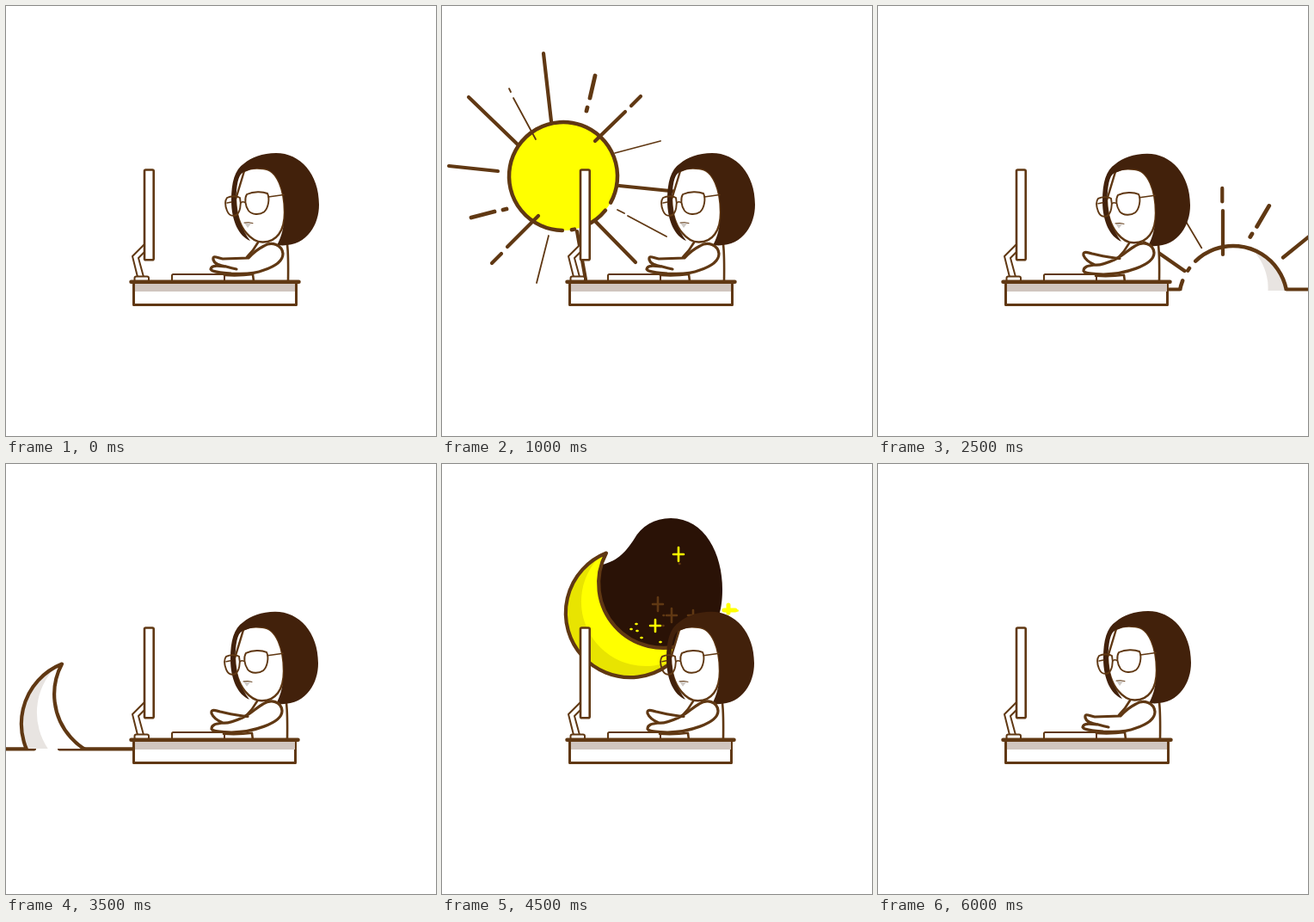
An HTML page that plays this animation: 500 px wide and 500 px high, repeating every 6500 ms.

```html
<!DOCTYPE html>
<html lang="en">
<head>
<meta charset="utf-8">
<title>Day and night at the desk</title>
<style>
  html, body { margin: 0; width: 100%; height: 100%; overflow: hidden; background: #fff; }
  svg { display: block; width: 500px; height: 500px; }
  .line { stroke: #603813; stroke-linecap: round; stroke-linejoin: round; }
  .shade { fill: #42210b; fill-opacity: .12; stroke: none; }
</style>
</head>
<body>
<svg viewBox="0 0 500 500" fill="none">
  <clipPath id="aboveGround"><path d="M0 0H500V331H0Z"/></clipPath>

  <path id="ground" class="line" stroke-width="4.2"/>

  <g clip-path="url(#aboveGround)">
    <g id="sun" class="line">
      <circle class="fill" r="63" stroke="none"/>
      <path id="sunShade" class="shade" d="M-57.1 26.4A63 63 0 1 1 62.9-1A63 63 0 0 0-57.1 26.4Z"/>
      <path id="sunRim" stroke-width="4.5"/>
      <g transform="translate(-141 -198)">
        <path stroke-width="4.2" d="M118 55L127 134M231 105L220 116M213 123L178 157M206 209L275 216M178 250L225 298M157 262L167 318M112 244L76 280M69 288L58 299M65 192L8 186M88 161L31 106"/>
        <path stroke-width="4.8" d="M178 81L172 107M169 118L168 122M75 236L71 237M61 239L34 246"/>
        <path stroke-width="1.8" d="M254 157L201 171M261 268L216 244M212 241L204 237M124 267L110 322M109 155L83 107M80 100L78 96"/>
      </g>
    </g>

    <g id="moon" class="line">
      <g id="night" stroke-width="2.6">
        <path fill="#2a1206" stroke="none" d="M186 117C205 113 215 100 223 88C232 72 247 63 266 63C306 63 326 105 326 146C326 180 315 214 262 215A75 75 0 0 1 186 117Z"/>
        <path d="M251 155v16M245 163h12M267 168v16M261 176h12M292 170v12M286 176h12M276 116h.5M257.500 176h.5M257 188h.5"/>
        <path stroke="#ff0" d="M275 97v16M269 105h12M248 181v14M242 188h12M225.500 186h1M219.500 192h1M226.500 194h1M231.500 202h1M253.500 207h1"/>
        <path stroke="#ff0" stroke-width="5" d="M333 164v9M328 170h10M341 170h-2"/>
        <path stroke="#ff0" d="M343.500 170.500h.2"/>
      </g>
      <path class="fill" stroke="none" d="M191 103.500A75 75 0 1 0 285 208.500A75 75 0 0 1 191 103.500Z"/>
      <path class="shade" d="M184.500 106.400A75 75 0 1 0 271.500 226.600A75 75 0 0 1 184.500 106.400Z"/>
      <path stroke-width="4.2" d="M191 103.500A75 75 0 1 0 285 208.500A75 75 0 0 1 191 103.500Z"/>
    </g>
  </g>

  <g class="line" fill="#fff">
    <path stroke-width="2" d="M161 277L147 291L153 315H160L154 293L161 286Z"/>
    <rect x="149.500" y="314.500" width="16.500" height="6" rx="2" stroke-width="2"/>
    <rect x="161" y="190.500" width="10.700" height="104.700" rx="1.500" stroke-width="2.600"/>
    <rect x="193" y="312" width="61" height="9" rx="1.500" stroke-width="2"/>
  </g>

  <g id="person" class="line">
    <path fill="#fff" stroke-width="2.600" d="M293 274L280 292L254 313L287 312.500L288 320H328V290L327 276Z" stroke="none"/>
    <path stroke-width="2.600" d="M327 277Q328.500 290 328 320M293 275Q288 284 280 292M254 313Q272 314 287 312L288 320"/>
    <path fill="#fff" stroke-width="2.400" d="M277 192C284 188 292 188 299 189C316 190 324 215 324 240C324 262 314 274.500 299 274.500C288 275 268 262 267 225Z"/>
    <path fill="#42210b" stroke="none" d="M315 278C349 282 364 255 364 231C364 195 342 171 314 171C298 171 285 176 277 183C266 190 262 205 262 226C262 250 271 268 284 273C274 260 268 245 267.500 225C268 208 270 197 275 194C284 189 292 188.500 299 189C316 190 324 215 324 240C324 255 320 270 315 278Z"/>
    <path stroke-width="1.900" d="M280 219C288 215.500 298 215.500 304 218C307 224 305 235 300 239.500C295 243 286 243 282 238C278 232 277 224 280 219ZM257 223C262 220.500 269 221 272 223C274 231 272 240 268 243C263 245 259 243 257 238C255 233 254 227 257 223Z"/>
    <path stroke-width="1.500" d="M273 229Q275 227 278 228.500M305 222L323 219.500M257 229L262 228"/>
    <path fill="#cfcac6" stroke="none" d="M277 252L285 253L281 258Z"/>
    <path stroke-width="1" d="M277 252Q282 251 287 252.500"/>
  </g>

  <g class="line" fill="#fff" stroke-width="3.200">
    <path id="armRest" d="M282 293L252 294C246 293 240 289 241 295C242 299 248 302 256 303C246 302 239 301 238 306C240 310 252 310 262 311C275 312 290 311 300 307C312 303 322 297 322 288C321 278 309 273 300 279C294 282 288 286 282 293ZM256 303Q263 305 268 306"/>
    <path id="armTap" d="M281 293.500C270 293 258 290 249 288C243 286 238 285 239 290C241 295 245 298 252 301C244 302 239 303 239 308C241 312 252 311 262 312C285 312 321 302 321 287C320 276 308 273 299 279C290 284 286 290 275 295C266 299 258 302 252 301"/>
  </g>

  <path id="desk" class="line" fill="#fff" stroke-width="3"/>
  <path fill="#d0c5be" d="M150 322H336V332H150Z"/>
  <path id="deskTop" class="line" stroke-width="4.500"/>
</svg>

<script>
const STEP = 500, YELLOW = '#ff0';
const $ = id => document.getElementById(id);
const show = (id, on) => $(id).style.display = on ? '' : 'none';
const place = (id, value) => $(id).setAttribute('transform', value);
const draw = (id, d) => $(id).setAttribute('d', d);

// One entry per step: the body in the sky, its position, and whether it is on the ground.
const sky = [
  {},
  { sun: [82, 342], low: true },
  { sun: [141, 198] },
  { sun: [251, 136] },
  { sun: [361, 192] },
  { sun: [413, 342], low: true },
  {},
  { moon: [-126, 129], low: true },
  { moon: [-101, 46] },
  { moon: [0, 0] },
  { moon: [133, 32] },
  { moon: [190, 129], low: true },
  {}
];

function rimArc(from, to) {
  const point = deg => {
    const a = deg * Math.PI / 180;
    return `${63 * Math.cos(a)} ${63 * Math.sin(a)}`;
  };
  return `M${point(from)}A63 63 0 ${to - from > 180 ? 1 : 0} 1 ${point(to)}`;
}
draw('sunRim', rimArc(39, 66) + rimArc(78, 81) + rimArc(91, 389));

function groundPath({ sun, moon, low }) {
  if (!low) return '';
  const [left, right, y] = sun
    ? [sun[0] - 62, sun[0] + 62, 329.5]
    : [moon[0] + 159, moon[0] + 188, 331.3];
  const [start, end] = left < 250 ? [-5, 148] : [337, 505];
  return `M${start} ${y}H${left}M${Math.min(right, end)} ${y}H${end}`;
}

function render(step) {
  const now = sky[step], { sun, moon, low } = now;
  show('sun', sun);
  show('moon', moon);
  draw('ground', groundPath(now));
  for (const id of ['sun', 'moon'])
    $(id).querySelector('.fill').setAttribute('fill', low ? '#fff' : YELLOW);
  if (sun) {
    place('sun', `translate(${sun}) rotate(${45 * (step - 2)})`);
    show('sunShade', step > 2);
  }
  if (moon) {
    place('moon', `translate(${moon})`);
    show('night', !low);
  }

  const tap = step % 2;
  show('armRest', !tap);
  show('armTap', tap);
  place('person', tap ? 'translate(-1 .8)' : '');
  const right = 337.5 - tap;
  draw('desk', `M148.500 321H${right}V347.500H148.500Z`);
  draw('deskTop', `M145.500 320.700H${right + 3}`);
}

let shown = -1;
function tick() {
  const step = Math.floor(performance.now() / STEP) % sky.length;
  if (step !== shown) render(shown = step);
  requestAnimationFrame(tick);
}
tick();
</script>
</body>
</html>
```
